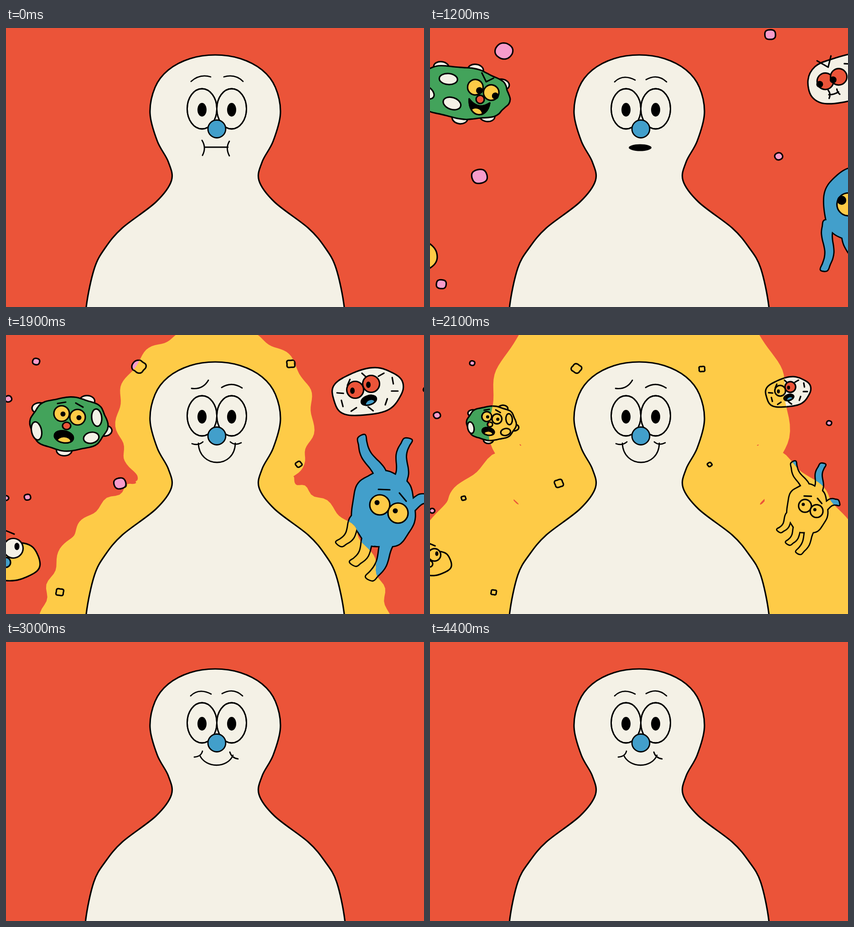
An HTML page with a canvas for the animation above (4500 ms loop, 917 by 611 pixels).

```html
<!DOCTYPE html>
<html lang="en">
<head>
<meta charset="utf-8">
<title>Glow</title>
<style>
html, body { margin: 0; width: 100%; height: 100%; overflow: hidden; background: #eb5439; }
canvas { display: block; }
</style>
</head>
<body>
<canvas id="stage" width="917" height="611"></canvas>
<script>
const ctx = document.getElementById('stage').getContext('2d');
const LOOP = 4500, STEP = 100, LINE = 3.2;
const RED = '#eb5439', CREAM = '#f4f1e6', YELLOW = '#fecb47', GREEN = '#43a35b',
      BLUE = '#429fcb', PINK = '#f79ccb', TONGUE = '#f15f40', BLACK = '#000';
let bleached = false; // inside the glow, every colour turns yellow

// ---------- helpers ----------
function closedCurve(pts) {
  const n = pts.length, at = i => pts[(i + n) % n], path = new Path2D();
  path.moveTo(...pts[0]);
  for (let i = 0; i < n; i++) {
    const [a, b, c, d] = [at(i - 1), at(i), at(i + 1), at(i + 2)];
    path.bezierCurveTo(b[0] + (c[0] - a[0]) / 6, b[1] + (c[1] - a[1]) / 6,
                       c[0] - (d[0] - b[0]) / 6, c[1] - (d[1] - b[1]) / 6, c[0], c[1]);
  }
  return path;
}

// Slightly squared ellipse with a rippled edge
function wavy(x, y, rx, ry, waves, amp, phase = 0, turn = 0) {
  const pts = [], bulge = v => Math.sign(v) * Math.abs(v) ** .9;
  for (let i = 0; i < 40; i++) {
    const a = i * Math.PI / 20, q = 1 + amp * Math.sin(waves * a + phase);
    const u = rx * q * bulge(Math.cos(a)), v = ry * q * bulge(Math.sin(a));
    pts.push([x + u * Math.cos(turn) - v * Math.sin(turn), y + u * Math.sin(turn) + v * Math.cos(turn)]);
  }
  return closedCurve(pts);
}

function oval(x, y, rx, ry = rx, turn = 0) {
  const path = new Path2D();
  path.ellipse(x, y, rx, ry, turn, 0, 7);
  return path;
}

function shape(path, fill, outline = true) {
  ctx.fillStyle = bleached && fill !== BLACK ? YELLOW : fill;
  ctx.fill(path);
  if (outline) ctx.stroke(path);
}

const line = d => ctx.stroke(new Path2D(d));
const dot = (x, y, rx, ry) => shape(oval(x, y, rx, ry), BLACK, false);
const white = (...a) => shape(oval(...a), CREAM);

function clipped(path, draw) {
  ctx.save();
  ctx.clip(path);
  draw();
  ctx.restore();
}

function openMouth(path, tongue, color) {
  shape(path, BLACK);
  clipped(path, () => shape(tongue, color, false));
  ctx.stroke(path);
}

function dash(x, y, a) {
  const dx = 7 * Math.cos(a), dy = 7 * Math.sin(a);
  line(`M${x - dx} ${y - dy}L${x + dx} ${y + dy}`);
}

function tentacle([x1, y1, x2, y2, width]) {
  const dx = x2 - x1, dy = y2 - y1, len = Math.hypot(dx, dy), left = [], right = [];
  for (let u = 0; u < 1.05; u += .125) {
    const sway = 5 * Math.sin(u * 7), w = width * (1 - .45 * u);
    const spot = off => [x1 + dx * u - dy / len * off, y1 + dy * u + dx / len * off];
    left.push(spot(sway + w));
    right.unshift(spot(sway - w));
  }
  return closedCurve([...left, ...right]);
}

// Body and limbs joined into one outline
function squid(parts, color) {
  ctx.save();
  ctx.lineWidth *= 1.8;
  parts.forEach(p => ctx.stroke(p));
  ctx.restore();
  parts.forEach(p => shape(p, color, false));
}

// Two eyes; look is the pupil offset of both
function eyes(color, r, [x1, y1, x2, y2], [lx, ly], pr, ph = pr) {
  for (const [x, y] of [[x1, y1], [x2, y2]]) {
    shape(oval(x, y, r), color);
    dot(x + lx, y + ly, pr, ph);
  }
}

// ---------- germs ----------
function spottedSkin(x, y, rx, ry, bumps, waves) {
  for (const a of bumps) white(x + rx * .95 * Math.cos(a), y + ry * Math.sin(a), 17, 12);
  shape(wavy(x, y, rx, ry, waves, .025, 1), GREEN);
}

function greenMean(t) {
  spottedSkin(112, 194, 109, 56, [-2.05, -1.3, -.55, .88, 1.5, 2.35], 9);
  white(83, 168, 20, 12, -.05);
  white(39, 203, 19, 12, .5);
  white(98, 220, 20, 13, .2);
  eyes(YELLOW, 17, [144, 178, 180, 185], [10, 6], 7.5);
  shape(oval(158, 203, 9), RED);
  line('M154 145L166 163L181 153');
  if (t < 1200) line('M137 210Q145 238 170 228L180 217M133 211L141 208M169 216L182 224');
  else openMouth(new Path2D('M134 205Q157 228 180 208C179 246 137 247 134 205Z'), oval(153, 235, 13, 11), YELLOW);
}

function greenScared() {
  spottedSkin(138, 195, 84, 58, [-2.5, -1.05, .25, 1.7], 8);
  white(199, 181, 11, 19, -.1);
  white(67, 210, 11, 20, -.2);
  white(187, 225, 17, 12, -.2);
  eyes(YELLOW, 17, [122, 172, 157, 180], [3, 1], 5.5);
  shape(oval(133, 199, 9, 8), RED);
  openMouth(oval(127, 223, 21, 13, .2), oval(127, 233, 14, 9), YELLOW);
  line('M113 150L131 147M153 149L169 158');
}

const worm = closedCurve([[718, 130], [732, 100], [765, 83], [830, 64], [915, 60], [945, 82], [895, 126], [830, 165], [762, 180], [728, 166]]);

function whiteMean() {
  shape(worm, CREAM);
  for (let i = 0; i < 11; i++) dash(803 + 9.5 * i, 116 - 2.7 * i + 29 * Math.sin(i * 2.4 + 4.2), i * 1.9);
  eyes(RED, 18, [756, 131, 785, 120], [-12, 7], 7.5);
  line('M736 87L761 100L766 75M763 150Q770 158 766 168M765 160Q776 160 786 153M782 147Q784 155 789 158');
}

function whiteScared() {
  shape(wavy(793, 125, 78, 50, 5, .03, 2, -.2), CREAM);
  for (let i = 0; i < 10; i++) {
    const a = i * Math.PI / 5 + .2;
    dash(793 + 61 * Math.cos(a), 125 + 38 * Math.sin(a) - 10 * Math.cos(a), i * 1.9);
  }
  eyes(RED, 18.5, [766, 120, 801, 107], [-6, 2], 5, 7);
  openMouth(oval(796, 143, 17, 10, -.3), oval(799, 150, 10, 7, -.5), BLUE);
}

const meanSquid = [wavy(832, 376, 76, 80, 6, .02), ...[
  [772, 415, 768, 523, 12], [812, 430, 851, 543, 14], [870, 425, 906, 540, 16],
  [835, 313, 960, 302, 18], [870, 360, 960, 360, 17], [860, 415, 960, 424, 18]].map(tentacle)];
const scaredSquid = [wavy(828, 382, 68, 82, 7, .025), ...[
  [826, 325, 777, 224, 14], [860, 325, 879, 228, 14], [870, 375, 935, 358, 14],
  [780, 395, 733, 460, 13], [810, 430, 764, 503, 14], [852, 435, 800, 535, 15]].map(tentacle)];

function blueMean() {
  squid(meanSquid, BLUE);
  eyes(YELLOW, 25, [809, 376, 841, 391], [-15, -8], 10);
  line('M830 335L839 356L864 350');
}

function blueScared() {
  squid(scaredSquid, BLUE);
  eyes(YELLOW, 22, [820, 372, 860, 390], [-6, -5], 5.5);
  line('M817 338L842 339M863 346L878 364');
}

function yellowMean() {
  shape(wavy(13, 490, 66, 38, 3, .02), YELLOW);
  eyes(CREAM, 21, [8, 461, 42, 457], [10, -9], 9.5);
  shape(oval(27, 488, 13, 11), BLUE);
  line('M-8 415L17 433L26 414');
}

function yellowScared() {
  shape(wavy(8, 495, 66, 42, 5, .03), YELLOW);
  eyes(CREAM, 21.5, [-24, 467, 16, 467], [8, -4], 5.5, 8);
  shape(oval(-1, 498, 11), BLUE);
  line('M-4 427L18 436');
}

// from: offset and turn at 800 ms; end: place and radius of the crumb that is left
const germs = [
  { color: GREEN, mean: greenMean, scared: greenScared, pivot: [160, 190], mid: [140, 195],
    from: [-108, -108, .31], end: [128, 190, 16] },
  { color: CREAM, mean: whiteMean, scared: whiteScared, pivot: [770, 125], mid: [794, 125],
    from: [260, -32, .1], end: [770, 126, 18], core: [-2, 1] },
  { color: BLUE, mean: blueMean, scared: blueScared, pivot: [830, 400], mid: [830, 378],
    from: [250, 27, .15], end: [827, 378, 21], core: [6, 11] },
  { color: YELLOW, mean: yellowMean, scared: yellowScared, pivot: [20, 480], mid: [10, 495],
    from: [-150, 25, -.2], end: [-2, 508, 12] }
];

function posed([px, py], dx, dy, turn, size, draw) {
  ctx.save();
  ctx.translate(px + dx, py + dy);
  ctx.rotate(turn);
  ctx.scale(size, size);
  ctx.translate(-px, -py);
  ctx.lineWidth = LINE / size;
  draw();
  ctx.restore();
}

function drawGerm(g, t, seed) {
  const [x, y, r] = g.end;
  if (t < 1700) {
    const away = (1500 - t) / 700 * (t > 1500 ? .2 : 1);
    posed(g.pivot, ...g.from.map(v => v * away), 1, () => g.mean(t));
  } else if (t < 2300) {
    const k = Math.max(0, (t - 1900) / 600), [mx, my] = g.mid;
    posed(g.mid, (x - mx) * k, (y - my) * k, 0, 1 - k * 1.09, g.scared);
  } else {
    const size = r * (t < 2500 ? 1 + (2500 - t) / 400 : 1 - (t - 2500) / 250);
    shape(wavy(x, y, size, size * .9, 5, .08, seed), g.color);
    if (!g.core) return;
    const cx = x + g.core[0], cy = y + g.core[1];
    shape(wavy(cx, cy, size * .48, size * .4, 3, .12, seed), g.color);
    dot(cx + 1, cy, size * .16);
  }
}

// ---------- pink specks: radius, place at 1500 ms, speed per second ----------
const specks = [
  [17, 174, 325, 206, 0], [8.5, 708, 282, -179, 3], [19, 222, 59, 188, 27], [10, 5, 50, 166, 22],
  [11, 68, 562, 136, 3], [12, 690, 37, -177, 71], [9, -14, 350, 166, 14],
  [7.5, -19, 57, 65, 225], [5.5, -10, 293, 28, 174], [5.5, 1026, -49, -285, 458]
];

function drawSpecks(t) {
  const k = (t - 1500) / 1000, drift = k - .2 * k * k;
  specks.forEach(([r, x, y, vx, vy], i) => {
    const lingers = r < 8, size = lingers ? 1 : Math.min(1, 1 - (t - 1700) / 900);
    if (size < .25) return;
    shape(wavy(x + vx * drift, y + vy * drift, r * size, r * size * .9, 4, bleached ? .1 : .03, i), PINK);
  });
}

function drawGerms(t) {
  if (t < 100 || t > 2600) return;
  drawSpecks(t);
  germs.forEach((g, i) => drawGerm(g, t, i * 1.7));
}

// ---------- figure ----------
const MID = 459;
const half = [[55, 67], [103, 92], [132, 130], [143, 187], [127, 248], [103, 293], [96, 334], [130, 381],
  [204, 438], [241, 481], [265, 526], [283, 611], [285, 690]];

function bodyPoints(loose) {
  const side = half.map(([x, y]) => [x + (loose && y > 500 ? 1.5 : 0), y]);
  return [...side.map(([x, y]) => [MID - x, y]).reverse(), [MID, 59], ...side.map(([x, y]) => [MID + x, y])];
}
const bodies = [false, true].map(loose => closedCurve(bodyPoints(loose)));

// Dense samples along the open body line
function sampleBody() {
  const pts = bodyPoints(false), last = pts.length - 1, out = [];
  const blend = (a, b, c, d, u) =>
    b + .5 * u * (c - a + u * (2 * a - 5 * b + 4 * c - d + u * (3 * (b - c) + d - a)));
  for (let i = 0; i < last; i++) {
    const [a, b, c, d] = [pts[Math.max(0, i - 1)], pts[i], pts[i + 1], pts[Math.min(last, i + 2)]];
    for (let n = 0; n < 12; n++) out.push([0, 1].map(j => blend(a[j], b[j], c[j], d[j], n / 12)));
  }
  return out;
}
const rim = sampleBody();

function glowPath(reach, t) {
  const path = new Path2D();
  let walked = 0;
  for (let i = 1; i < rim.length - 1; i++) {
    const [x, y] = rim[i], dx = rim[i + 1][0] - rim[i - 1][0], dy = rim[i + 1][1] - rim[i - 1][1];
    const len = Math.hypot(dx, dy);
    walked += len / 2;
    const wave = Math.min(5, reach / 8) * Math.sin(walked / 9 + t / 300);
    const far = reach * (.9 + Math.max(0, y - 330) / 280 * .3) + wave;
    path.lineTo(x + dy / len * far, y - dx / len * far);
  }
  path.closePath();
  return path;
}

function glowReach(t) {
  if (t <= 1650 || t >= 2950) return 0;
  return t < 2600 ? 80 * ((t - 1650) / 250) ** 1.6 : 520 * (1 - (t - 2600) / 350);
}

const brows = {
  raised: 'M406 117Q425 100 449 107M478 107Q503 100 520 117',
  calm: 'M405 118Q423 100 450 114M474 113Q499 99 519 118',
  tilted: 'M407 117Q432 120 444 99M473 115Q495 101 518 116',
  wry: 'M405 117Q416 98 451 106M480 95Q483 112 517 120'
};

const mouths = {
  flat: () => line('M436 261H487M430 246Q440 262 431 279M490 248Q481 263 490 280'),
  open: () => openMouth(oval(461, 266, 20.5, 15.5), oval(461, 279, 17, 13), TONGUE),
  thin: () => dot(461, 262, 25, 7.5),
  grin: () => line('M422 237C424 293 502 293 503 237M408 238Q422 243 432 234M492 234Q502 243 516 236'),
  laugh: () => {
    openMouth(new Path2D('M409 240L425 240Q462 283 498 240L514 240C508 321 417 321 409 240Z'),
      oval(462, 296, 40, 18), TONGUE);
    line('M401 242Q420 246 432 235M490 234Q505 243 524 240');
  },
  smile: () => line('M425 248C438 277 486 277 498 248M413 252Q428 251 431 239M491 241Q495 254 509 256')
};

// pupil: shift, height, radii
const looks = { ahead: [0, 179, 10, 15], squint: [2, 177, 23, 12.5], aside: [27, 178, 8, 11] };

const acting = [
  [0, 'ahead', 'raised', 'flat'],
  [700, 'squint', 'calm', 'open'],
  [900, 'ahead', 'calm', 'open'],
  [1200, 'ahead', 'calm', 'thin'],
  [1800, 'ahead', 'tilted', 'grin'],
  [2300, 'aside', 'wry', 'laugh'],
  [2800, 'ahead', 'calm', 'smile']
];

function drawFigure(t) {
  const loose = +'001110001'[t / STEP % 9];
  const [, look, brow, mouth] = acting.filter(a => a[0] <= t).pop();
  const [shift, y, rx, ry] = looks[look];
  shape(bodies[loose], CREAM);
  ctx.lineWidth = 2.8;
  for (const x of [430, 495]) {
    const eye = oval(x, 177, 32.5, 44);
    shape(eye, CREAM);
    clipped(eye, () => dot(x + shift, y, rx, ry));
    ctx.stroke(eye);
  }
  shape(oval(462.5, 221, 19.5), BLUE);
  line(brows[brow]);
  mouths[mouth]();
}

function draw(t) {
  ctx.lineWidth = LINE;
  ctx.strokeStyle = BLACK;
  ctx.lineCap = ctx.lineJoin = 'round';
  ctx.fillStyle = RED;
  ctx.fillRect(0, 0, 917, 611);
  drawGerms(t);
  const reach = glowReach(t);
  if (reach > 0) {
    const glow = glowPath(reach, t);
    shape(glow, YELLOW, false);
    bleached = true;
    clipped(glow, () => drawGerms(t));
    bleached = false;
  }
  drawFigure(t);
}

const start = performance.now();
function tick() {
  const t = Math.max(0, performance.now() - start) % LOOP;
  draw(Math.floor(t / STEP) * STEP);
  requestAnimationFrame(tick);
}
tick();
</script>
</body>
</html>
```
